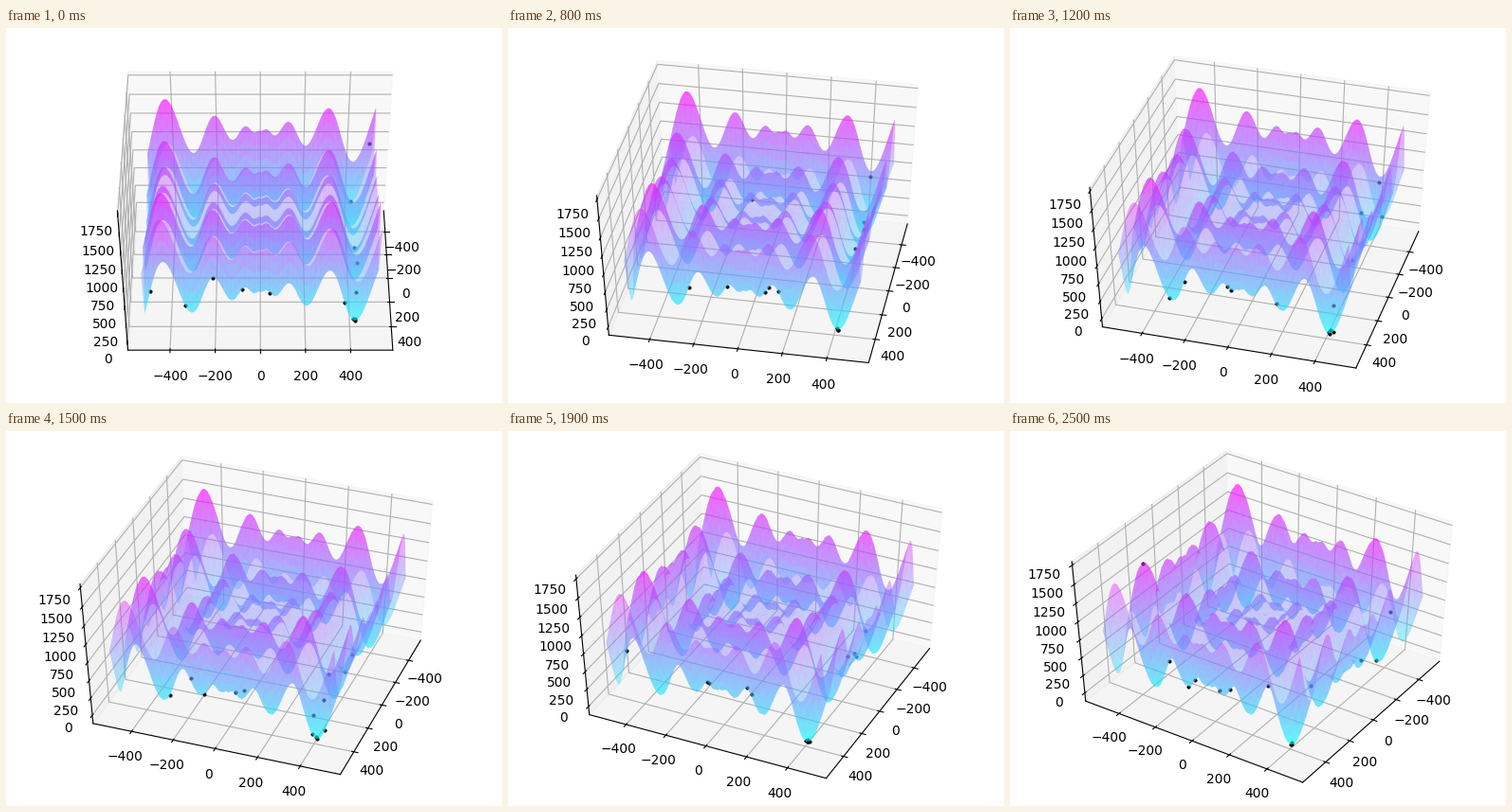
A matplotlib script that plays this animation: 523x396 px, repeating every 2.6 s.

```python
import numpy as np
import matplotlib.pyplot as plt
from matplotlib.animation import FuncAnimation

WIDTH, HEIGHT, DPI = 523, 396, 100
AXES_W, AXES_H = 496, 369.6
FRAMES, INTERVAL = 26, 100
BOUND = 512
BEST = 421
PADDING = 1.1 * 25 / 24  # data margin plus the pane's own margin


def schwefel(x, y):
    return sum(418.9829 - v * np.sin(np.sqrt(np.abs(v))) for v in (x, y))


def padded(low, high):
    middle, half = (low + high) / 2, (high - low) / 2
    return middle - half * PADDING, middle + half * PADDING


def population(i):
    """Random offspring, most of which inherit one coordinate of the best point."""
    rng = np.random.default_rng(i)
    x, y = rng.uniform(-BOUND, BOUND, (2, 14))
    x[:8] = BEST
    y[7:13] = BEST
    x[0], y[0] = BEST - 8, BEST - 6
    return x, y, schwefel(x, y)


fig = plt.figure(figsize=(WIDTH / DPI, HEIGHT / DPI), dpi=DPI, facecolor="white")
ax = fig.add_axes([(1 - AXES_W / WIDTH) / 2, (1 - AXES_H / HEIGHT) / 2,
                   AXES_W / WIDTH, AXES_H / HEIGHT], projection="3d")
ax.apply_aspect = lambda position=None: None  # keep the wide axes rectangle
ax.set_box_aspect((1, 1, 1), zoom=np.sqrt(3) / 1.8294640721620434)
ax.computed_zorder = False

grid = np.linspace(-BOUND, BOUND, 100)
X, Y = np.meshgrid(grid, grid)
Z = schwefel(X, Y)
ax.plot_surface(X, Y, Z, rstride=2, cstride=2, cmap="cool", alpha=0.4,
                linewidth=0, antialiased=True, zorder=2)
dots, = ax.plot([], [], [], "o", color="black", ms=2.4, mew=0.5, zorder=1)

ax.set_xlim(*padded(-BOUND, BOUND))
ax.set_ylim(*padded(-BOUND, BOUND))
ax.set_zlim(*padded(Z.min(), Z.max()))
ax.set_xticks(range(-400, 401, 200))
ax.set_yticks(range(-400, 401, 200))
ax.set_zticks(range(0, 1751, 250))


def update(i):
    ax.view_init(elev=45, azim=i * 4 / 3 + 1e-4)
    dots.set_data_3d(*population(i))
    return dots,


anim = FuncAnimation(fig, update, frames=FRAMES, interval=INTERVAL,
                     repeat=True, repeat_delay=0, blit=False)
plt.show()
```
